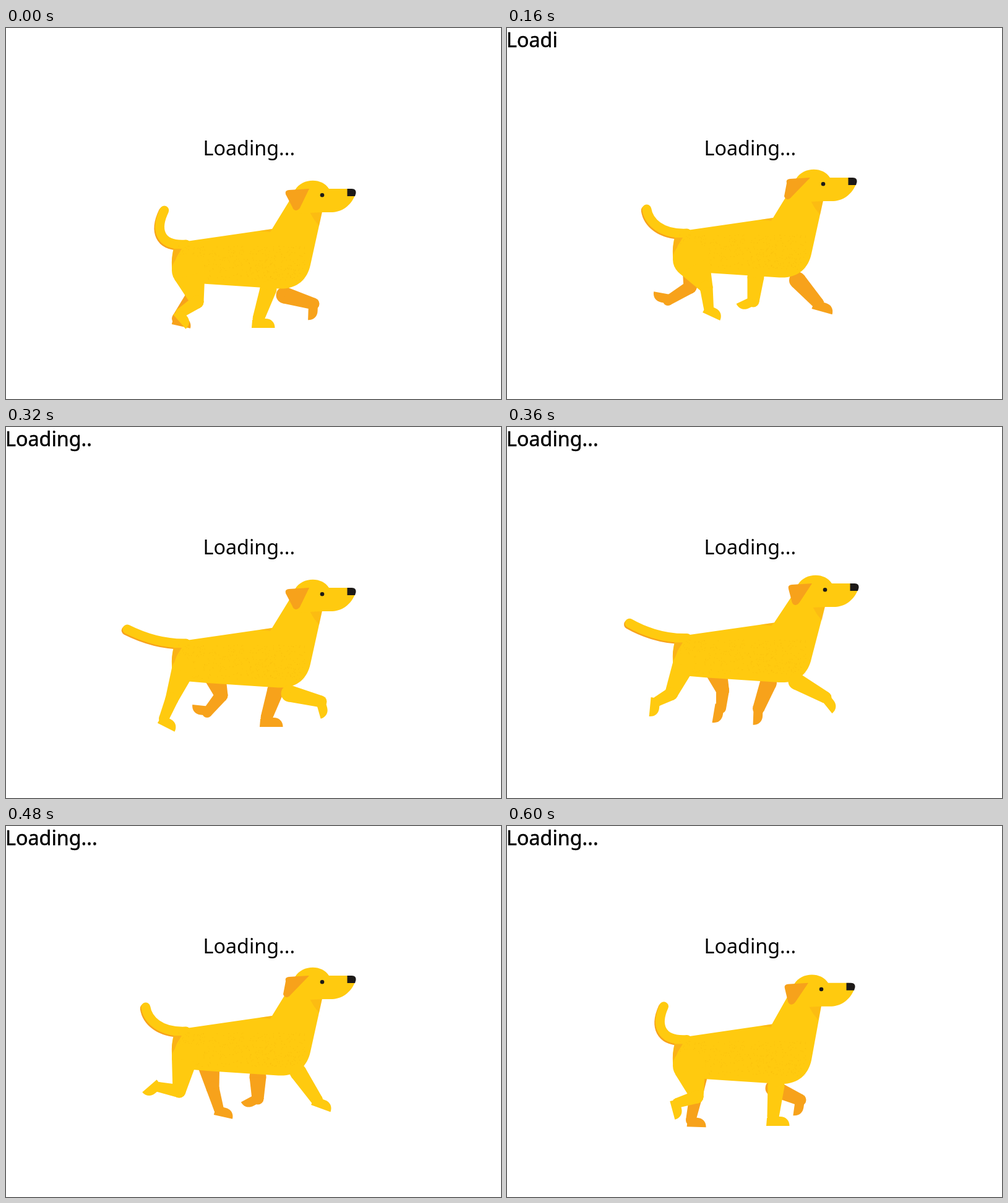
Recreate the animation shown at these times as an HTML page with a canvas. Size 800 by 600 pixels, loop 640 ms.

```html
<!DOCTYPE html>
<html lang="en">
<head>
<meta charset="utf-8">
<title>Loading</title>
<style>
html, body { margin: 0; height: 100%; overflow: hidden; background: #fff }
canvas { display: block }
</style>
</head>
<body>
<canvas id="stage" width="800" height="600"></canvas>
<script>
const c = document.getElementById('stage').getContext('2d');
const STEP = 40, STEPS = 16;
const YELLOW = '#ffca0f', ORANGE = '#f7a21b', BLACK = '#1d1a18';

// step, body dy, head dx, head dy, ear tip x
const TRUNK = [
  [0, 0, 0, 0, 469], [2, -17, 6, -14, 458], [4, -18, 0, -18, 454], [6, -9, -6, -12.5, 457]
];
// step, upper joint x y, ankle x y, foot angle
const FRONT_NEAR = [
  [0, 424, 422, 408, 470, 0], [2, 410, 400, 383, 447, 184], [4, 402, 402, 398, 442, 155],
  [6, 408, 412, 430, 455, 117], [8, 458, 431, 509, 444, 74], [10, 478, 392, 521, 431, 28],
  [12, 472, 398, 503, 444, 20], [15, 435, 420, 430, 470, 0]
];
const FRONT_FAR = [
  [0, 450, 432, 497, 446, 92], [2, 472, 411, 522, 427, 4], [6, 467, 405, 484, 464, 27],
  [8, 436, 425, 421, 470, 0], [10, 409, 402, 392, 441, 184], [12, 407, 405, 407, 441, 152],
  [15, 431, 424, 474, 443, 98]
];
const HIND_NEAR = [
  [0, 309, 443, 282, 461, 49], [2, 331, 411, 328, 444, 42], [4, 322, 419, 326, 453, 25],
  [6, 308, 436, 316, 464, 27], [8, 268, 440, 255, 472, 27], [10, 263, 423, 230, 416, 164],
  [12, 280, 429, 246, 422, 139], [15, 307, 438, 275, 448, 75]
];
const HIND_FAR = [
  [0, 300, 435, 276, 470, 13], [2, 282, 410, 240, 430, 182], [4, 296, 419, 260, 441, 190],
  [6, 314, 434, 287, 460, 195], [8, 348, 434, 325, 462, 186], [10, 349, 418, 367, 448, 13],
  [12, 334, 424, 344, 458, 13], [15, 305, 438, 297, 476, 2]
];

// Linear blend of the two keys around a step, wrapping at the period.
function pose(keys, step, period = STEPS) {
  const s = step % period;
  let n = keys.findIndex(k => k[0] > s);
  if (n < 0) n = keys.length;
  const a = keys[n - 1], b = keys[n % keys.length];
  const end = n < keys.length ? b[0] : period;
  const u = (s - a[0]) / (end - a[0]);
  return a.slice(1).map((v, j) => v + (b[j + 1] - v) * u);
}

function shape(points, color, alpha = 1) {
  c.globalAlpha = alpha;
  c.fillStyle = color;
  c.beginPath();
  points.forEach(([x, y]) => c.lineTo(x, y));
  c.fill();
  c.globalAlpha = 1;
}

function dot(x, y, r, color) {
  c.fillStyle = color;
  c.beginPath();
  c.arc(x, y, r, 0, 7);
  c.fill();
}

// Two discs joined by their outer tangents.
function limb(x1, y1, r1, x2, y2, r2, color) {
  const dir = Math.atan2(y2 - y1, x2 - x1);
  const off = Math.acos((r1 - r2) / Math.hypot(x2 - x1, y2 - y1));
  const at = (x, y, r, a) => [x + r * Math.cos(a), y + r * Math.sin(a)];
  dot(x1, y1, r1, color);
  dot(x2, y2, r2, color);
  shape([at(x1, y1, r1, dir - off), at(x2, y2, r2, dir - off),
    at(x2, y2, r2, dir + off), at(x1, y1, r1, dir + off)], color);
}

function foot(x, y, angle, heel, toe, sole, color) {
  c.save();
  c.translate(x, y);
  c.rotate(angle * Math.PI / 180);
  c.fillStyle = color;
  c.beginPath();
  c.moveTo(heel, sole);
  c.lineTo(toe, sole);
  c.bezierCurveTo(toe, sole - 9, toe - 6, sole - 15, toe - 15, sole - 15);
  c.lineTo(0, sole - 15);
  c.lineTo(Math.min(heel, 0) * .9, 2);
  c.fill();
  c.restore();
}

function frontLeg(keys, step, color) {
  const [ex, ey, ax, ay, angle] = pose(keys, step);
  limb(ex, ey, 13.5, ax, ay, 9.5, color);
  foot(ax, ay, angle, -11 + .2 * Math.min(angle, 80), 26.5, Math.max(8, 15 - .25 * angle), color);
}

function hindLeg(keys, step, dy, near, color) {
  const [kx, ky, ax, ay, angle] = pose(keys, step);
  const r = near ? 18 + .2 * (kx - 265) : 20;
  const hx = near ? 268 + r : 308 + .6 * (kx - 305);
  limb(hx, 392 + dy, r, kx, ky, 10.5, color);
  limb(kx, ky, 10.5, ax, ay, 8, color);
  foot(ax, ay, angle, -6, 25, 10.5, color);
}

function tail(step, dy) {
  const k = Math.cos(step / STEPS * 2 * Math.PI);
  const stroke = (color, width, dx, up) => {
    c.strokeStyle = color;
    c.lineWidth = width;
    c.beginPath();
    c.moveTo(225 + 30 * k + dx, 296 - 16 * k + dy + 16 - up);
    c.bezierCurveTo(228 + 13 * k + dx, 331.5 - 6.5 * k + dy - up,
      247.5 - 2.5 * k + dx, 353 + k + dy - up, 290 + dx, 351 + dy - up);
    c.stroke();
  };
  c.lineCap = 'round';
  c.save();
  c.translate(0, -16 * (1 - 0));
  c.restore();
  stroke(ORANGE, 15, -.8, -1);
  stroke(YELLOW, 15, .8, 1);
}

function body(dy, hx, hy) {
  c.fillStyle = YELLOW;
  c.beginPath();
  c.moveTo(284, 346 + dy);
  c.lineTo(292, 345 + dy);
  c.lineTo(430 + .6 * hx, 325 + dy);
  c.lineTo(457 + hx, 281 + hy);
  c.lineTo(490 + hx, 270 + hy);
  c.lineTo(511 + hx, 297 + hy);
  c.lineTo(492, 383 + dy);
  c.bezierCurveTo(487, 407 + dy, 470, 423 + dy, 440, 421.5 + dy);
  c.lineTo(325, 414 + dy);
  c.lineTo(290, 411 + dy);
  c.quadraticCurveTo(268, 405 + dy, 268, 388 + dy);
  c.quadraticCurveTo(267, 370 + dy, 271, 356 + dy);
  c.fill();

  shape([[271, 357 + dy], [284, 357 + dy], [276, 370 + dy], [269, 388 + dy], [268, 374 + dy]], ORANGE, .6);
  shape([[410, 328 + dy], [430 + .6 * hx, 325 + dy], [427, 330 + dy]], ORANGE, .4);
  shape([[487 + hx, 291 + hy], [511 + hx, 297 + hy], [506 + hx, 320 + hy], [498 + hx, 310 + hy]], ORANGE, .35);

  // Fixed paper grain on the flank.
  let seed = 7;
  const rand = () => (seed = seed * 16807 % 2147483647) / 2147483647;
  c.fillStyle = 'rgba(236,170,15,.3)';
  for (let n = 0; n < 380; n++) c.fillRect(278 + rand() * 205, 352 + rand() * 56 + dy, 1, 1);
}

function head(dx, dy, earX) {
  c.save();
  c.translate(dx, dy);
  c.fillStyle = YELLOW;
  c.beginPath();
  c.moveTo(457, 281);
  c.lineTo(467, 262);
  c.bezierCurveTo(479, 242, 511, 242, 522, 260);
  c.lineTo(556, 260);
  c.lineTo(564, 271);
  c.bezierCurveTo(555, 291, 540, 298, 525, 298);
  c.lineTo(509, 298);
  c.lineTo(475, 300);
  c.fill();

  c.fillStyle = BLACK;
  c.beginPath();
  c.moveTo(551.5, 260);
  c.lineTo(559, 260);
  c.quadraticCurveTo(566, 260, 565.5, 267);
  c.lineTo(564, 272);
  c.lineTo(551.5, 272);
  c.fill();
  dot(511, 270.2, 3.3, BLACK);

  c.fillStyle = ORANGE;
  c.beginPath();
  c.moveTo(490, 260);
  c.lineTo(earX + 6, 291);
  c.quadraticCurveTo(earX + 3, 295, earX - 1, 295);
  c.quadraticCurveTo(earX - 5, 294, earX - 6, 290);
  c.lineTo(452, 269);
  c.quadraticCurveTo(450, 263, 457, 262);
  c.fill();
  c.restore();
}

function label(text, x, y, outline) {
  c.font = '32.3px "Noto Sans", "Open Sans", sans-serif';
  c.fillStyle = c.strokeStyle = '#000';
  c.fillText(text, x, y);
  if (outline) {
    c.lineWidth = outline;
    c.strokeText(text, x, y);
  }
}

function draw(now) {
  const step = Math.floor(now / STEP) % STEPS;
  const [dy, hx, hy, earX] = pose(TRUNK, step, 8);
  c.fillStyle = '#fff';
  c.fillRect(0, 0, 800, 600);

  label('Loading...'.slice(0, step && step + 1), -1, 31, .5);
  label('Loading...', 318.5, 206);

  hindLeg(HIND_FAR, step, dy, false, ORANGE);
  frontLeg(FRONT_FAR, step, ORANGE);
  tail(step, dy);
  body(dy, hx, hy);
  hindLeg(HIND_NEAR, step, dy, true, YELLOW);
  frontLeg(FRONT_NEAR, step, YELLOW);
  head(hx, hy, earX);
  requestAnimationFrame(() => draw(performance.now()));
}
draw(performance.now());
</script>
</body>
</html>
```
